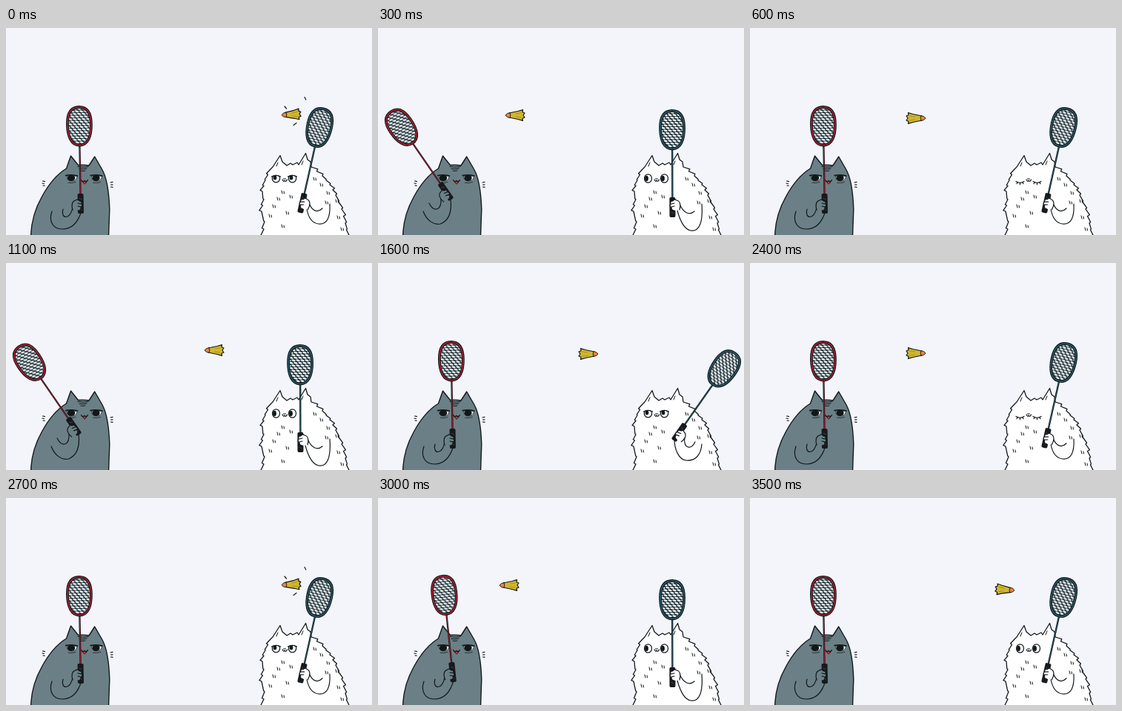
These frames come from a looping animation (494 px wide and 280 px high, 3600 ms). An HTML page:

```html
<!DOCTYPE html>
<html lang="en">
<head>
<meta charset="utf-8">
<title>Cat badminton</title>
<style>
  html, body { margin: 0; width: 100%; height: 100%; overflow: hidden; background: #f3f5fb; }
  svg { display: block; width: 494px; height: 280px; }
  .ink { fill: none; stroke: #11181b; stroke-width: 1.2; stroke-linecap: round; stroke-linejoin: round; }
  .grey { fill: #6b8086; }
  .white { fill: #fff; }
  .dark { fill: #11181b; }
</style>
</head>
<body>
<svg viewBox="0 0 494 280">
  <defs>
    <pattern id="net" width="6" height="7" patternUnits="userSpaceOnUse">
      <rect width="6" height="7" fill="#14262d"/>
      <g fill="#f3f7f9">
        <ellipse id="hole" cx="3" cy="1.75" rx="2.7" ry="1.3" transform="rotate(14 3 1.75)"/>
        <use href="#hole" x="-3" y="3.5"/>
        <use href="#hole" x="3" y="3.5"/>
      </g>
    </pattern>
    <path id="hoop" d="M0 -144C12 -144 16 -135 16 -121C16 -104 11 -92.500 0 -92.500C-11 -92.500 -16 -104 -16 -121C-16 -135 -12 -144 0 -144Z"/>
    <!-- The origin is the butt of the handle -->
    <g id="racket">
      <path d="M0 -92V-24" stroke="#11181b" stroke-width="2.3"/>
      <path d="M0 -92V-26" stroke="currentColor" stroke-width=".9"/>
      <rect x="-4" y="-27" width="8" height="27" rx="1.8" fill="#17191c"/>
      <path d="M-2 -21l4 2M-2 -14l4 2M-2 -7l4 2" stroke="#454a50" stroke-width=".8"/>
      <use href="#hoop" fill="url(#net)" stroke="#11181b" stroke-width="3.8"/>
      <use href="#hoop" fill="none" stroke="currentColor" stroke-width="1.7"/>
    </g>
  </defs>

  <g class="ink">
    <path class="grey" stroke-width="1.4" d="M33.500 282C34 264 39 245 48 229C57 212 67 199 81.500 190L87.500 173L97.500 185.500Q105 184.500 112 186L119.700 174L129.500 191C136.500 203 139 222 139.800 245L138.500 282"/>
    <path d="M97 187.500Q104 189 111 187.500M99 190.500Q104 191.500 109 190M101 193.200Q104 194 107 193" stroke-width="1"/>
    <path d="M49.500 207l3 .7M49 210l2.500 .5M50 213l2 .3M141 209l3 -.6M141.500 212l2.500 -.2M141.500 215l2.500 .4"/>
    <g id="sleepyEye">
      <path class="white" stroke-width=".8" d="M82 200.500C82 209 95 210 96 200.500Z"/>
      <ellipse class="dark" cx="88" cy="203" rx="4.600" ry="3.400"/>
      <path d="M80.500 199.500Q88 197.800 96.500 200" stroke-width="1.4"/>
      <path d="M84 209.300Q89 210.500 94 208.500" stroke-width=".7"/>
    </g>
    <use href="#sleepyEye" x="33.500"/>
    <path d="M103.500 207.500Q106 215 109 207.500Z" fill="#d2303c" stroke-width=".8"/>
    <path d="M101.500 205.500Q103.500 210 106 206.500Q108.500 210 110.500 205.500"/>
  </g>
  <path id="greyArm" class="ink"/>
  <use id="greyRacket" href="#racket" color="#b01c30"/>
  <path id="greyPaw" class="ink grey" d="M-7 6C-9 0 -8 -6 -3 -7Q0 -9 2 -6Q6 -6 5 -2Q7 1 4 3Q4 7 0 7M0 -3L4 -2M0 1L4 2"/>

  <g class="ink">
    <path id="coat" class="white" stroke-width="1.3"/>
    <path id="tufts" stroke-width="1"/>
    <path d="M365 187l2 -5M399 185l2 -5" stroke-width="1"/>
    <g id="eyes">
      <g>
        <g id="openEye">
          <ellipse class="white" cx="364.500" cy="203.500" rx="5" ry="5.700"/>
          <ellipse class="dark" cx="362.500" cy="203.500" rx="1.800" ry="3.200"/>
        </g>
        <use href="#openEye" x="22"/>
      </g>
      <g>
        <g id="halfEye">
          <path class="white" d="M359.500 201C357.500 211.500 371.500 211.500 369.500 201Q364.500 197.500 359.500 201Z"/>
          <ellipse class="dark" cx="363" cy="202.500" rx="1.800" ry="2.400"/>
          <path d="M358.500 201Q364.500 197.500 370.500 201"/>
        </g>
        <use href="#halfEye" x="22"/>
      </g>
      <g>
        <path id="shutEye" d="M359 207.500Q364.500 211 370 207.500M361 209l-1 1.700M364.500 210v1.800M368 209l1 1.700"/>
        <use href="#shutEye" x="23"/>
      </g>
    </g>
    <path d="M373 205Q375 209 376 206Q378 209 379.500 205M374.500 204h3"/>
  </g>
  <path id="whiteArm" class="ink"/>
  <use id="whiteRacket" href="#racket" color="#28596b"/>
  <path id="whitePaw" class="ink white" d="M7 6C9 0 8 -6 3 -7Q0 -9 -2 -6Q-6 -6 -5 -2Q-7 1 -4 3Q-4 7 0 7M0 -3L-4 -2M0 1L-4 2"/>

  <path id="impact" class="ink" d="M403 93.500l1.800 3.500M376 106l2.500 3M388 131.500l4 -3"/>
  <g id="shuttle" class="ink">
    <path fill="#d2b62f" d="M-8 -3L4 -5.500L10.500 -7.300L10 -4.300L13 -3L11 0L13 3L10 4.300L10.500 7.300L4 5.500L-8 3Z"/>
    <path fill="#f0823c" stroke-width=".9" d="M-7 -3.300Q-11 -3.200 -13 0Q-11 3.200 -7 3.300Q-5 0 -7 -3.300Z"/>
    <path d="M1 -2L8 -3M1 2L8 3" stroke="#94801f" stroke-width=".7"/>
  </g>
</svg>

<script>
  const $ = id => document.getElementById(id);
  const STEP = 100, LOOP = 3600, RALLY = 9;

  // Each pose: handle butt, tilt, paw centre and arm outline
  const greyRestArm = "M62 248C57 262 64 272 76 272C91 272 98 261 102 247M77 245C73 258 87 261 90 242";
  const greyPoses = {
    rest: { at: [101, 251], tilt: -1, paw: [97, 240], arm: greyRestArm },
    lean: { at: [102, 249], tilt: -6, paw: [97, 239], arm: greyRestArm },
    back: { at: [99, 232], tilt: -34.500, paw: [91, 226],
      arm: "M61 248C66 261 76 267 84 265C95 261 100 249 98 231M69 237C75 249 86 248 85 230" }
  };
  const whitePoses = {
    rest: { at: [397.500, 256], tilt: -.2, paw: [400, 240],
      arm: "M404 247C407 258 412 272 422 274C433 276 439 264 437 238M407 238C412 250 420 254 427 248" },
    lean: { at: [397, 250], tilt: 12.600, paw: [402, 238],
      arm: "M406 245C408 256 413 264 422 265C433 266 438 257 437 238M409 237C413 247 420 251 427 244" },
    back: { at: [399, 240], tilt: 35, paw: [407, 233],
      arm: "M400 238C400 252 406 266 416 267C428 268 436 260 437 245M414 236C412 250 422 254 428 242" }
  };

  // Flight towards the left, one row per rally
  const flights = [
    [385, 320, 254, 185, 122],
    [385, 335, 281, 215, 150],
    [385, 320, 254, 185, 122],
    [385, 316, 247, 177, 122]
  ];

  // Turns a side of the body into shaggy fur with tips hanging downwards
  function fur(points, reach) {
    let d = "";
    for (let i = 1; i < points.length; i++) {
      const [ax, ay] = points[i - 1], [bx, by] = points[i];
      const dx = bx - ax, dy = by - ay, len = Math.hypot(dx, dy);
      const n = Math.max(1, Math.round(len / 10));
      for (let k = 1; k <= n; k++) {
        const tip = (k - (dy > 0 ? .1 : .9)) / n, out = reach * (.7 + .4 * Math.sin(i * 3 + k * 5));
        d += `L${ax + dx * tip + dy / len * out} ${ay + dy * tip - dx / len * out}`;
        d += `L${ax + dx * k / n} ${ay + dy * k / n}`;
      }
    }
    return d;
  }

  const leftSide = [[347, 282], [349, 262], [345, 248], [348, 232], [346, 221], [350, 206], [357, 191]];
  const rightSide = [[412, 188], [427, 200], [437, 212], [445, 226], [453, 245], [458, 264], [461, 282]];
  $("coat").setAttribute("d", "M347 282" + fur(leftSide, 3) +
    "L360 188L370 172.500L373 181L379 186L384 183L387 185L393 182L395 185L404.500 169.500L407 178L411 181L412 188" +
    fur(rightSide, 3));

  const tufts = [[372, 220], [366, 229], [360, 239], [355, 252], [383, 226], [378, 248], [372, 266],
    [415, 202], [424, 210], [433, 221], [431, 234], [445, 232], [447, 254], [452, 270]];
  $("tufts").setAttribute("d", tufts.map(([x, y]) => `M${x} ${y}l1 4m2 -3l.5 3`).join(""));

  function hold(cat, pose) {
    $(cat + "Racket").setAttribute("transform", `translate(${pose.at}) rotate(${pose.tilt})`);
    $(cat + "Paw").setAttribute("transform", `translate(${pose.paw}) rotate(${pose.tilt})`);
    $(cat + "Arm").setAttribute("d", pose.arm);
  }

  function greyPose(rally, beat) {
    if (beat === 2 || (beat === 3 && rally < 3)) return greyPoses.back;
    return beat >= 1 && beat <= 4 ? greyPoses.lean : greyPoses.rest;
  }

  function whitePose(beat) {
    if (beat === 7) return whitePoses.back;
    return beat >= 1 && beat <= 5 ? whitePoses.rest : whitePoses.lean;
  }

  function draw(time) {
    const tick = Math.floor(time % LOOP / STEP);
    const rally = Math.floor(tick / RALLY), beat = tick % RALLY;
    const returning = beat > 4;

    hold("grey", greyPose(rally, beat));
    hold("white", whitePose(beat));

    const x = returning ? 224 + 60 * (beat - 6) : flights[rally][beat];
    const y = returning ? 116 + beat : beat ? 118 : 117;
    const turn = returning ? 180 + (beat === 8 ? 4 : 0) : beat ? 0 : -3;
    $("shuttle").setAttribute("transform", `translate(${x} ${y}) rotate(${turn})`);
    $("impact").style.display = beat ? "none" : "";

    const look = beat === 6 ? 2 : [0, 5, 7].includes(beat) ? 1 : 0;
    [...$("eyes").children].forEach((eye, i) => eye.style.display = i === look ? "" : "none");
  }

  const start = performance.now();
  function loop() {
    draw(performance.now() - start);
    requestAnimationFrame(loop);
  }
  loop();
</script>
</body>
</html>
```
